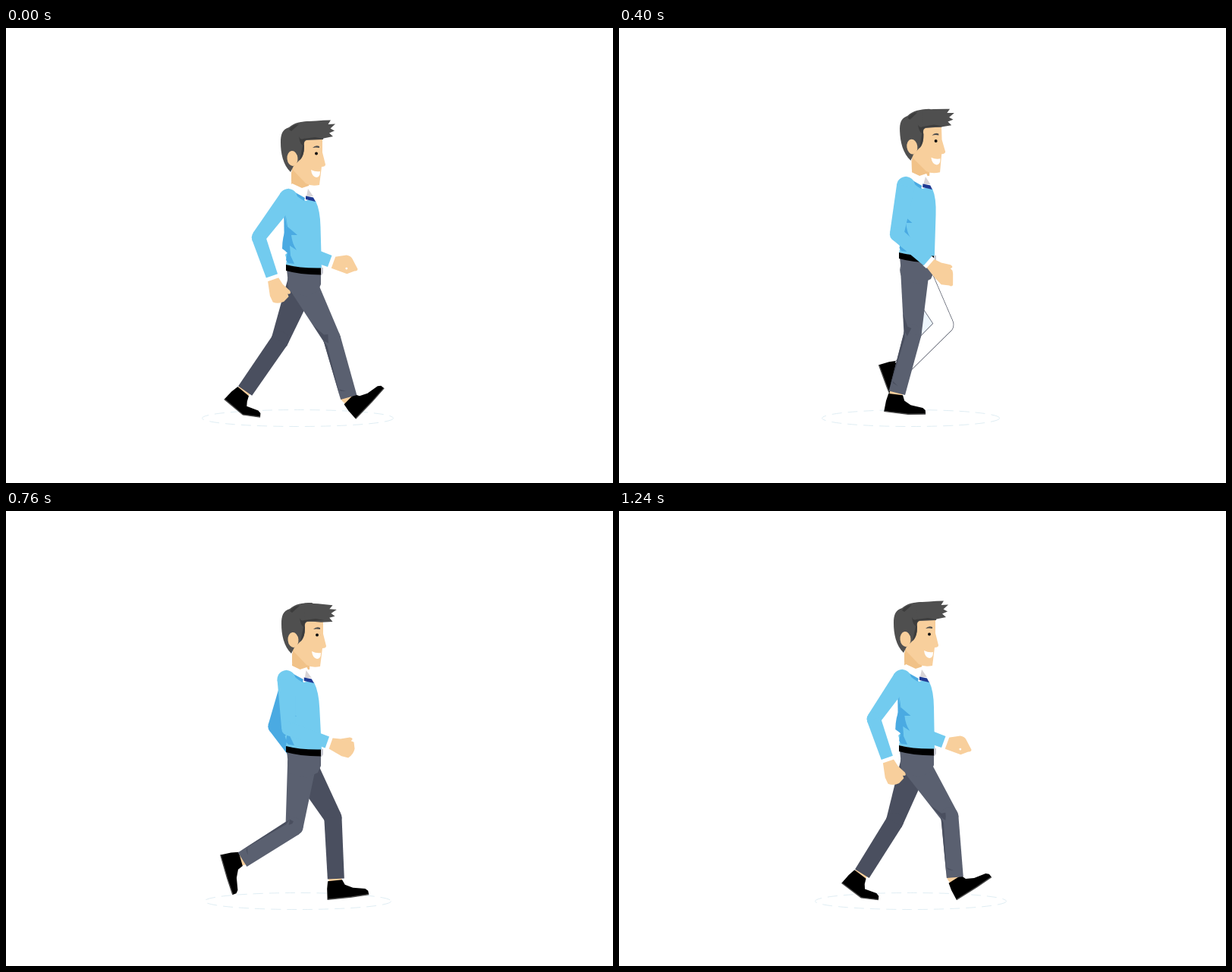
Animation of 800 by 600 pixels, one loop 1.28 s. Source, as an HTML page with a canvas:

```html
<!DOCTYPE html>
<html lang="en">
<head>
<meta charset="utf-8">
<title>Walk cycle</title>
<style>
html, body { margin: 0; width: 100%; height: 100%; overflow: hidden; background: #fff; }
canvas { display: block; }
</style>
</head>
<body>
<canvas id="stage" width="800" height="600"></canvas>
<script>
const ctx = document.getElementById('stage').getContext('2d');
const STEP = 40, COUNT = 32, RAD = Math.PI / 180;
const C = {
  skin: '#f8cf9c', skinDark: '#f1c288', hair: '#4f4f4f', hairDark: '#3c3c3c',
  blue: '#72cbef', blueDark: '#4aaae2', trousers: '#5a6070', trousersDark: '#4a4f5f',
  tint: '#eef6fd', navy: '#1f3a93'
};

// Each row: step, then the values at that step.
// body: rise, lean, neck x, head turn, hair tip turn, ground ellipse radius
const body = [
  [0, 0, 0, 0, 0, 0, 126], [4, 1, 4, 4, -5, 0, 121.5], [7, -8, 5.5, 8, -4, 2, 118],
  [10, -16, 6, 10, -2, 4, 117], [14, -8, -1, 2.5, -2.5, 9, 124.5], [16, -1, -2, 1.5, -1, 9, 126],
  [19, -2, -2.5, 1, 0, 8, 123], [23, -9, -3, 0, 0, 5, 119], [26, -16, -3, 0, -1, 2, 119],
  [27, -15.5, -3, 0, -1, 2, 120], [31, -3, 1, 0, 0, 0, 126]
];
// legs: thigh, shin, foot
const nearLeg = [
  [0, 28, 16, -46], [3, 31.5, 2, -6], [4, 32.4, -7, 0], [7, 15.5, -12.5, 3],
  [10, -2, -14.8, 7], [14, -8.8, -33, 33], [16, -11, -38, 43], [19, -6.8, -57.7, 74],
  [23, 11, -60, 80], [26, 25.5, -41, 63], [27, 29.4, -33, 56], [30, 36, -5, -12], [31, 33, 5, -32]
];
const farLeg = [
  [0, -20.7, -34.5, 40], [4, 2.8, -61, 79], [7, 18, -59, 80], [10, 28.4, -45, 70],
  [11, 32.5, -37, 58], [14, 43.6, -11.6, 8], [16, 36, 10, -38], [19, 29.9, 2.8, -6],
  [20, 30, -6, 0], [23, 10, -12, 3], [27, -13.9, -12.5, 8], [29, -17, -23, 22], [31, -19, -32, 37]
];
// arms: upper arm, forearm
const nearArm = [
  [0, -37, 19], [2, -39, 24], [4, -38, 30], [10, -10.6, 49], [14, 3.5, 69], [16, 5, 72],
  [19, 2.6, 70.5], [23, -7, 47], [27, -19.5, 23], [31, -35, 19]
];
const farArm = [
  [0, 0, 70], [4, -7, 67], [10, -5, 42], [14, -13, 31], [19, -17, 36], [23, -8, 42], [27, 0, 50], [31, 0, 70]
];

// Periodic cubic interpolation through the rows.
function sample(rows, f) {
  const n = rows.length;
  const at = i => rows[(i + n) % n];
  const time = i => at(i)[0] + COUNT * Math.floor(i / n);
  let i = n - 1;
  while (rows[i][0] > f) i--;
  const t0 = time(i), t1 = time(i + 1), h = t1 - t0, u = (f - t0) / h;
  return at(i).slice(1).map((_, k) => {
    const v = j => at(j)[k + 1];
    const slope = j => (v(j + 1) - v(j - 1)) / (time(j + 1) - time(j - 1));
    const a = v(i), b = v(i + 1), d = b - a;
    const p = slope(i) * h, q = slope(i + 1) * h;
    return a + u * (p + u * (3 * d - 2 * p - q + u * (p + q - 2 * d)));
  });
}

const reach = (p, deg, len) => [p[0] + Math.sin(deg * RAD) * len, p[1] + Math.cos(deg * RAD) * len];

function turn([x, y], deg) {
  const c = Math.cos(deg * RAD), s = Math.sin(deg * RAD);
  return [x * c - y * s, x * s + y * c];
}

function poly(points, color) {
  ctx.beginPath();
  points.forEach(p => ctx.lineTo(p[0], p[1]));
  ctx.closePath();
  ctx.fillStyle = color;
  ctx.fill();
}

function dot(x, y, r, color) {
  ctx.beginPath();
  ctx.arc(x, y, r, 0, 2 * Math.PI);
  ctx.fillStyle = color;
  ctx.fill();
}

function fill(d, color) {
  ctx.fillStyle = color;
  ctx.fill(new Path2D(d));
}

// Tapered limb with round joints and a flat end.
function limb(points, radii, color) {
  for (let i = 0; i < points.length - 1; i++) {
    const [a, b] = [points[i], points[i + 1]], [r, s] = [radii[i], radii[i + 1]];
    const len = Math.hypot(b[0] - a[0], b[1] - a[1]);
    const nx = (b[1] - a[1]) / len, ny = (a[0] - b[0]) / len;
    dot(a[0], a[1], r, color);
    poly([[a[0] + nx * r, a[1] + ny * r], [b[0] + nx * s, b[1] + ny * s],
          [b[0] - nx * s, b[1] - ny * s], [a[0] - nx * r, a[1] - ny * r]], color);
  }
}

function solveLeg(rows, f, rise, thighLen) {
  const [thigh, shin, foot] = sample(rows, f);
  const hip = [390, 335 + rise], knee = reach(hip, thigh, thighLen);
  return { thigh, shin, foot, hip, knee, ankle: reach(knee, shin, 81) };
}

function drawShoe({ ankle, foot }) {
  const place = p => { const q = turn(p, foot); return [ankle[0] + q[0], ankle[1] + q[1]]; };
  const ball = place([18, 26]);
  const lift = Math.max(0, Math.min(1, (515 - ball[1]) / 20));
  const toeTurn = foot > 0 ? foot * lift : foot;
  const toe = (x, y) => { const q = turn([x - 18, y - 26], toeTurn); return [ball[0] + q[0], ball[1] + q[1]]; };
  limb([place([-1, -3]), place([-1, 7])], [8.5, 8.5], C.skin);
  const heel = place([-14, 26]), tip = toe(41, 25);
  poly([place([-11, 2]), place([8, 2]), place([11, 9]), toe(21, 14), toe(37, 17), toe(40.5, 20), tip, ball, heel, place([-13, 12])], '#000');
  ctx.beginPath();
  [heel, ball, tip].forEach(p => ctx.lineTo(p[0], p[1]));
  ctx.strokeStyle = '#4a4a4a';
  ctx.lineWidth = 1.4;
  ctx.stroke();
}

function drawLeg(leg, near, hollow, rise) {
  const { hip, knee, ankle, thigh, shin } = leg;
  const shape = (grow, color) => {
    limb([hip, knee, ankle], [19 + grow, 11.6 + grow, 11 + grow], color);
    if (!near) return;
    const y = 318 + rise;
    poly([[370 - grow, y], [415 + grow, y], [415 + grow, y + 20], [411 + grow, y + 29],
          [396, y + 36], [373 - grow, y + 30]], color);
  };
  drawShoe(leg);
  if (hollow) {
    shape(0.7, C.trousersDark);
    shape(0, '#fff');
  } else {
    shape(0, near ? C.trousers : C.trousersDark);
  }
  if (!near) return;
  const across = (p, deg, v) => reach(p, deg + 90, v);
  const back = across(knee, shin, -11.4);
  const hem = across(ankle, shin, -11);
  poly([back, across(reach(knee, shin, 8), shin, -8.5), hem], C.trousersDark);
  poly([across(reach(knee, thigh, -26), thigh, -13.5), across(reach(knee, thigh, -9), thigh, -7),
        across(reach(knee, thigh, -7), thigh, -2), across(knee, shin, -5),
        across(reach(knee, shin, 5), shin, -6), back], C.trousersDark);
  poly([across(reach(ankle, shin, -14), shin, -10), across(reach(ankle, shin, -9), shin, -1),
        across(reach(ankle, shin, -11), shin, -8)], C.trousersDark);
}

function solveArm(rows, f, shoulder) {
  const [upper, fore] = sample(rows, f);
  const elbow = reach(shoulder, upper, 65);
  return { shoulder, elbow, fore, wrist: reach(elbow, fore, 54) };
}

function drawArm({ shoulder, elbow, wrist, fore }, near) {
  ctx.save();
  ctx.translate(wrist[0], wrist[1]);
  ctx.rotate((90 - fore) * RAD);
  fill(near
    ? 'M3-7V6L15 9 26 16Q31 17 30 12L33 12 36 4Q37-5 32-10L24-11Z'.replace('M3-7', 'M3 7').replace('V6', 'V-7').replace('L15 9 26 16Q31 17 30 12L33 12 36 4Q37-5 32-10L24-11Z', 'L15-10 26-16Q32-17 29-12L33-12 37-4Q38 4 33 10L24 11Z')
    : 'M3 8V-7L18-15Q24-16 27-13L38-3Q39 0 35 1L27 8Z', C.skin);
  if (!near) dot(24, 1.5, 1.4, '#fff');
  fill('M-1-8.5H5V8.5H-1Z', '#fff');
  ctx.restore();

  let color = C.blue;
  if (!near) {
    color = ctx.createLinearGradient(399, 0, 400, 0);
    color.addColorStop(0, C.blueDark);
    color.addColorStop(1, C.blue);
  }
  limb([shoulder, elbow, wrist], [near ? 12 : 10, 9.2, 8], color);
}

function drawHead(x, y, tilt, tips) {
  ctx.save();
  ctx.translate(395 + x, 205 + y);
  ctx.rotate(tilt * RAD);
  ctx.translate(-395, -205);
  fill('M377 182L376 206 388 212 399 211 400 195Z', C.skinDark);
  fill('M380 150L392 146 417 145 417 164 421 180Q421 183 416 183L413 207Q402 209 395 205L378 187Z', C.skin);
  fill('M376 189Q385 202 399 207L398 211 386 208 376 202Z', C.skinDark);
  fill('M375 190C365 180 362 165 362 151C362 140 364 134 373 131C380 125 388 123 402 123L420 133 418 147 396 148Q392 149 393 156C393 165 391 172 386 175L379 182Z', C.hair);
  ctx.save();
  ctx.translate(395, 135);
  ctx.rotate(tips * RAD);
  ctx.translate(-395, -135);
  fill('M391 124Q408 122 428 121.5L424.5 127 434 126.5 427.5 132.5 433 135.5 426 138.5 431 143 416 146 394 147Z', C.hair);
  ctx.restore();
  fill('M373 134Q378 127 386 127L376 136Z', C.hairDark);
  fill('M393 156Q391 149 396 147L419 146 407 144 392 146Q388 148 386 143Q387 152 391 155L387 174Q393 168 393 156Z', C.hairDark);
  ctx.beginPath();
  ctx.ellipse(377.5, 172, 7, 10, -0.1, 0, 2 * Math.PI);
  ctx.fillStyle = C.skin;
  ctx.fill();
  fill('M404 158Q408 154 413 156L413 158Q408 157 404 158Z', C.hair);
  dot(409, 165.5, 2, '#111');
  fill('M402 187Q408 190 414 189Q414 197 409 197Q403 196 402 187Z', '#fff');
  ctx.restore();
}

function drawTorso(lean, rise) {
  ctx.save();
  ctx.transform(1, 0, -lean / 103, 1, lean * 314 / 103, rise);
  fill('M373 211L394 226 408 228Q414 240 414.5 262L416 317 390 317 369 312 370 306 368 299 372 295 367 288Q365 276 370 262L365 232Q364 216 373 211Z', C.blue);
  fill('M368 242L371 262 384 273 376 273Q377 284 383 293L374 287 375 300 380 311 372 310 369 306 371 296 364 291Q364 275 370 262Z', C.blueDark);
  fill('M372 212L377 205 390 211 399 208 407 224 395 228 385 222Z', '#fff');
  fill('M376 214L394 224 393 228Q384 223 376 214Z', C.blueDark);
  fill('M398 212L405 222 396 222Z', '#d8d4d6');
  fill('M395 221.5L405 223.5 408 229 395 226Z', C.navy);
  ctx.restore();
  ctx.save();
  ctx.translate(0, rise);
  fill('M369 312Q388 317 415 316.5V325.5Q386 325 369 320Z', '#000');
  fill('M415 316H418V323L416 326H415Z', '#c9cad2');
  ctx.restore();
}

function drawGround(rx) {
  ctx.save();
  ctx.beginPath();
  ctx.ellipse(384.5, 514.5, rx, 11, 0, 0, 2 * Math.PI);
  ctx.setLineDash([13, 8]);
  ctx.strokeStyle = '#dcebf2';
  ctx.lineWidth = 0.9;
  ctx.stroke();
  ctx.restore();
}

const within = (f, a, b) => f >= a && f <= b;

function draw(f) {
  const [rise, lean, neck, tilt, tips, rx] = sample(body, f);
  const near = solveLeg(nearLeg, f, rise, 84), far = solveLeg(farLeg, f, rise, 82);
  const armN = solveArm(nearArm, f, [372 + lean, 224 + rise]);
  const armF = solveArm(farArm, f, [376 + lean, 224 + rise]);
  const farHollow = within(f, 9, 11), nearHollow = within(f, 26, 28);

  ctx.fillStyle = '#fff';
  ctx.fillRect(0, 0, 800, 600);
  drawGround(rx);
  if (within(f, 2, 9) || within(f, 25, 29)) {
    poly([armN.shoulder, armN.elbow, armN.wrist, [375, 318 + rise]], C.tint);
  }
  if (farHollow || nearHollow) {
    poly([near.hip, near.knee, near.ankle, far.ankle, far.knee], C.tint);
  }
  drawArm(armF, false);
  drawLeg(far, false, farHollow, rise);
  drawLeg(near, true, nearHollow, rise);
  drawHead(neck, rise, tilt, tips);
  drawTorso(lean, rise);
  drawArm(armN, true);
}

function tick() {
  draw(Math.floor(performance.now() / STEP) % COUNT);
  requestAnimationFrame(tick);
}
tick();
</script>
</body>
</html>
```
